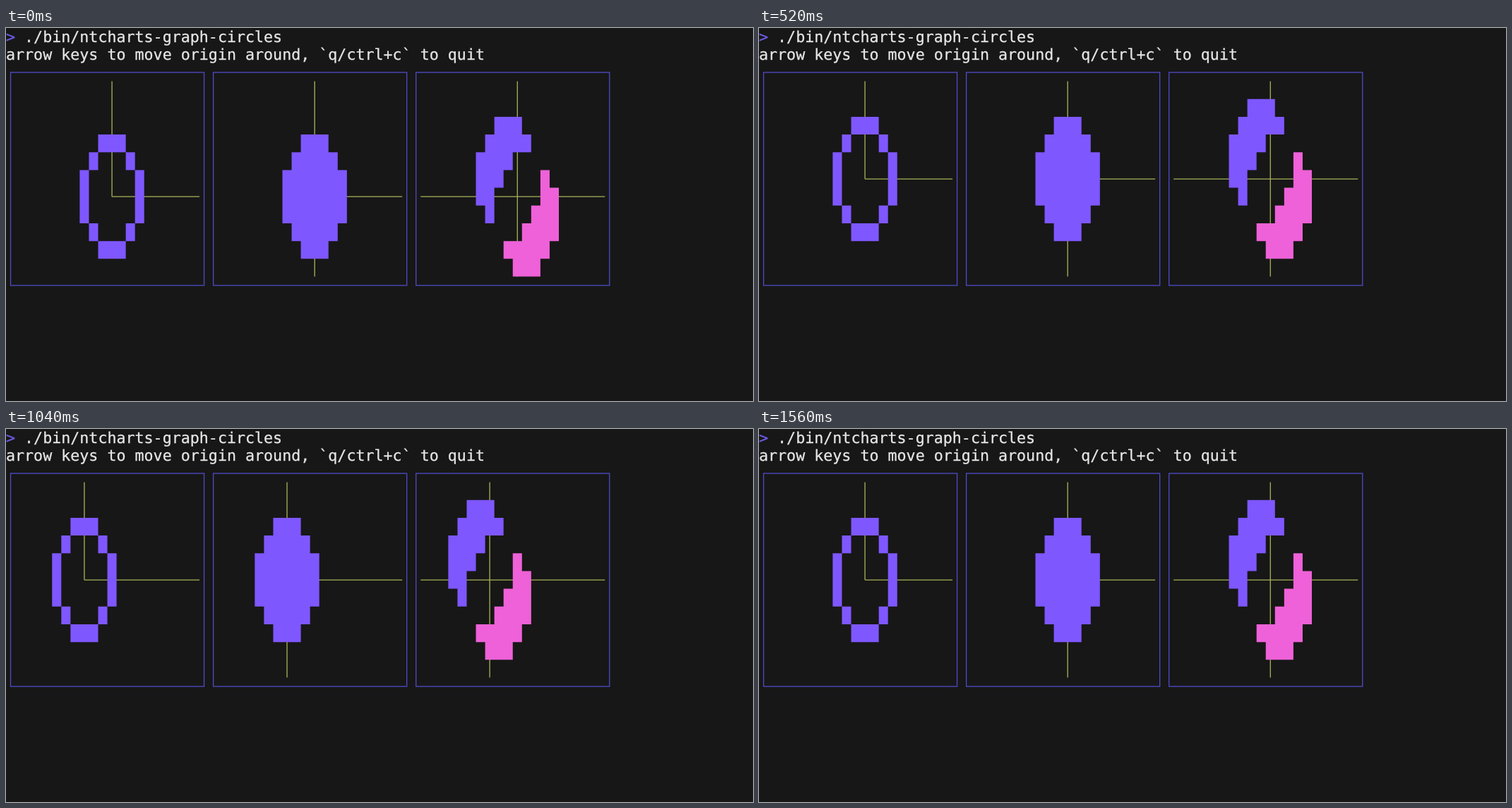
Recreate the animation shown at these times as an HTML page with a canvas. Size 1058x529 px, loop 1.76 s.

```html
<!DOCTYPE html>
<html lang="en">
<head>
<meta charset="utf-8">
<title>Graph circles</title>
<style>
  html, body { margin: 0; width: 100%; height: 100%; overflow: hidden; background: #171717; }
  canvas, pre { position: absolute; left: 0; top: 0; margin: 0; display: block; }
  pre {
    top: 1px;
    font: 21.67px/25.2px "DejaVu Sans Mono", "Liberation Mono", monospace;
    font-variant-ligatures: none;
    text-rendering: geometricPrecision;
    -webkit-text-stroke: 0.3px;
    color: #e6e6e6;
  }
  .prompt { color: #6c5ce8; }
</style>
</head>
<body>
<canvas id="stage" width="1058" height="529"></canvas>
<pre><span class="prompt">&gt;</span> ./bin/ntcharts-graph-circles
arrow keys to move origin around, `q/ctrl+c` to quit</pre>
<script>
const ctx = document.getElementById('stage').getContext('2d');
const CELL_W = 13.05, CELL_H = 25.18, LINE = 1.3;
const PANEL_COLS = 22, TOP_ROW = 2, BOTTOM_ROW = 14;
const LOOP = 1760;
const BACK = '#171717', BORDER = '#504bca', AXIS = '#aab35a', PURPLE = '#7f57ff', PINK = '#ee61d8';

// [start ms, column, row] of the origin inside each panel
const MOVES = [
  [0, 11, 9], [200, 11, 10], [360, 11, 9], [520, 11, 8], [720, 10, 8],
  [880, 9, 8], [1040, 8, 8], [1240, 9, 8], [1400, 10, 8], [1560, 11, 8]
];

// Runs of cells relative to the origin: [row, first column, last column]
const disc = [1, 2, 3, 3, 3, 2, 1].map((half, i) => [i - 3, -half, half]);
const ring = disc.flatMap(([row, a, b]) =>
  Math.abs(row) === 3 ? [[row, a, b]] : [[row, a, a], [row, b, b]]);
const upperArc = [[-4, -2, 0], [-3, -3, 1], [-2, -4, -1], [-1, -4, -2], [0, -4, -3], [1, -3, -3]];
const lowerArc = upperArc.map(([row, a, b]) => [-row, -b, -a]);

const panels = [
  { shapes: [[ring, PURPLE]] },
  { shapes: [[disc, PURPLE]], fullY: true },
  { shapes: [[upperArc, PURPLE], [lowerArc, PINK]], fullX: true, fullY: true }
];

const edgeX = col => col * CELL_W;
const edgeY = row => row * CELL_H;
const midX = col => (col + 0.5) * CELL_W;
const midY = row => (row + 0.5) * CELL_H;

function drawFrame(left) {
  const x = midX(left), y = midY(TOP_ROW);
  ctx.strokeStyle = BORDER;
  ctx.strokeRect(x, y, midX(left + PANEL_COLS - 1) - x, midY(BOTTOM_ROW) - y);
}

function drawAxes(left, col, row, fullX, fullY) {
  const x = midX(left + col), y = midY(row);
  ctx.strokeStyle = AXIS;
  ctx.beginPath();
  ctx.moveTo(x, edgeY(TOP_ROW + 1));
  ctx.lineTo(x, fullY ? edgeY(BOTTOM_ROW) : y);
  ctx.moveTo(fullX ? edgeX(left + 1) : x, y);
  ctx.lineTo(edgeX(left + PANEL_COLS - 1), y);
  ctx.stroke();
}

// One path per shape, so that neighbouring rows join without seams
function drawCells(runs, color, col, row) {
  ctx.fillStyle = color;
  ctx.beginPath();
  for (const [dy, a, b] of runs) {
    if (row + dy < BOTTOM_ROW) {
      ctx.rect(edgeX(col + a), edgeY(row + dy), (b - a + 1) * CELL_W, CELL_H);
    }
  }
  ctx.fill();
}

function render() {
  const time = performance.now() % LOOP;
  const [, col, row] = MOVES.findLast(([start]) => start <= time);
  ctx.fillStyle = BACK;
  ctx.fillRect(0, 0, 1058, 529);
  ctx.lineWidth = LINE;
  panels.forEach(({ shapes, fullX, fullY }, i) => {
    const left = i * PANEL_COLS;
    drawFrame(left);
    drawAxes(left, col, row, fullX, fullY);
    for (const [runs, color] of shapes) drawCells(runs, color, left + col, row);
  });
  requestAnimationFrame(render);
}
render();
</script>
</body>
</html>
```
